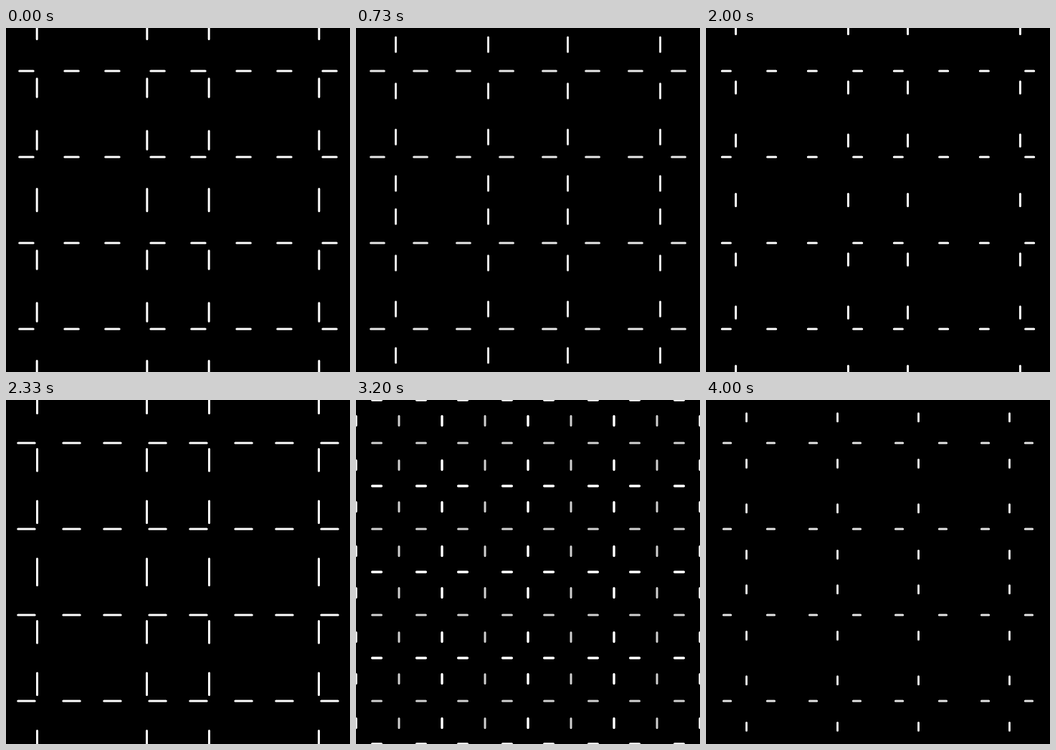
Recreate the animation shown at these times as an HTML page with a canvas. Size 480 by 480 pixels, loop 4.07 s.

```html
<!DOCTYPE html>
<html>
<head>
<meta charset="utf-8">
<style>
html, body { margin: 0; height: 100%; overflow: hidden; background: #000; }
canvas { display: block; width: 100vmin; height: 100vmin; }
</style>
</head>
<body>
<canvas id="stage" width="480" height="480"></canvas>
<script>
const ctx = document.getElementById('stage').getContext('2d');
const LOOP = 4070, STEPS_PER_MS = 0.015, LAST_STEP = 60;
const PULSE_PERIOD = 34, FIRST_PULSE = 5.4, CROSS_DELAY = 8.6;

// Turning points of the column offset: [step, offset]
const turns = [[-3, 79], [9, 64.2], [31, 78.5], [50, 59.5], [70, 67.5]];

const ease = u => (1 - Math.cos(Math.PI * u)) / 2;

function columnOffset(step) {
  const i = turns.findIndex(t => t[0] > step);
  const [t0, d0] = turns[i - 1], [t1, d1] = turns[i];
  return d0 + (d1 - d0) * ease((step - t0) / (t1 - t0));
}

// Signed number of steps from the nearest pulse
function pulsePhase(step) {
  const half = PULSE_PERIOD / 2;
  return (step - FIRST_PULSE + half) % PULSE_PERIOD - half;
}

// Mirrored dashes along one line, scaled by the cell size
function dashLine(pos, cell, length, spread, vertical) {
  const half = Math.max(0, cell * length / 2 - 1.2);
  for (const centre of [120, 360])
    for (const k of [-1.5 - spread, -.5 + spread, .5 - spread, 1.5 + spread]) {
      const a = centre + k * cell - half, b = a + 2 * half;
      ctx.moveTo(...(vertical ? [pos, a] : [a, pos]));
      ctx.lineTo(...(vertical ? [pos, b] : [b, pos]));
    }
}

function grid(light, columns, rows, cell, length, spread) {
  const v = Math.round(255 * light);
  ctx.strokeStyle = `rgb(${v},${v},${v})`;
  ctx.beginPath();
  for (const x of columns) dashLine(x, cell, length, spread, true);
  for (const y of rows) dashLine(y, 60, length, spread, false);
  ctx.stroke();
}

function draw(now) {
  const step = Math.min(LAST_STEP, Math.floor((now % LOOP + 5) * STEPS_PER_MS));
  const phase = pulsePhase(step);
  const d = columnOffset(step);
  const length = .2 + 1.05 * Math.exp(-Math.abs(phase) / 2.9);
  const spread = .0075 * Math.sqrt(Math.abs(d - 64.5));
  const light = Math.min(1, .82 + Math.max(0, d - 60) * .02);
  const cross = 1 - Math.abs(phase - CROSS_DELAY) / 3;

  ctx.filter = 'none';
  ctx.fillStyle = '#000';
  ctx.fillRect(0, 0, 480, 480);
  ctx.filter = 'blur(0.4px)';
  ctx.lineCap = 'round';
  ctx.lineWidth = 3;
  grid(light, [120 - d, 120 + d, 360 - d, 360 + d], [60, 180, 300, 420], d, length, spread);
  if (cross > 0) {
    const lines = [0, 120, 240, 360, 480];
    ctx.lineWidth = 3.4;
    grid(cross, lines, lines, d, length, spread);
  }
}

const start = performance.now();
function tick() {
  draw(performance.now() - start);
  requestAnimationFrame(tick);
}
tick();
</script>
</body>
</html>
```
